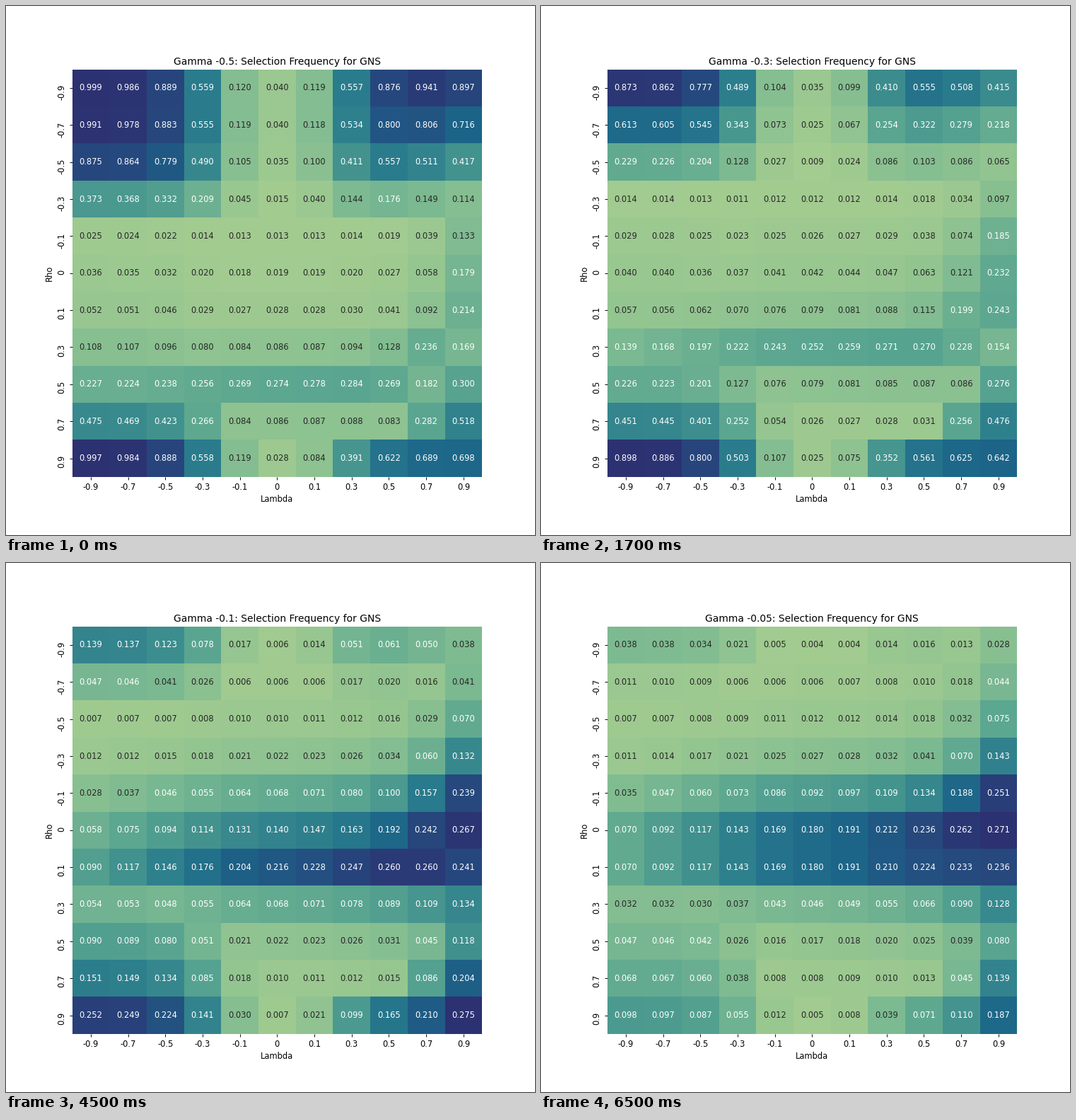
A matplotlib script for the animation above (8000 ms loop, 748x748 px).

```python
import matplotlib.pyplot as plt
import numpy as np
from matplotlib.animation import FuncAnimation
from matplotlib.colors import LinearSegmentedColormap

INCHES, DPI = 9, 748 / 9
STEP_MS, STEPS = 500, 16
GAMMAS = [-0.5, -0.3, -0.2, -0.1, -0.05]
WHITE_TEXT_FROM = .1535  # share of the table's maximum

positive = [0.1, 0.3, 0.5, 0.7, 0.9]
levels = np.array([-v for v in reversed(positive)] + [0] + positive)
level_names = [f"{v:g}" for v in levels]
lam, rho = np.meshgrid(levels, levels)
right = np.maximum(lam, 0)
crest = LinearSegmentedColormap.from_list("crest", [
    "#a5cd90", "#7dba91", "#59a590", "#40908e",
    "#287a8c", "#1c6488", "#254b7f", "#2c3172"])


def ridge(g):
    """Band along rho = -gamma that widens and sinks towards high lambda."""
    edge = right ** 4
    center = g + edge * (-.05 - g)
    width = .135 + .25 * edge
    height = .3 / (1 + .55 * np.exp(-3.5 * g - 2 * lam))
    return height * (1 - .8 * edge * g) / (1 + ((rho - center) / width) ** 2)


def valley():
    """Drop around lambda = 0 that both outer areas share."""
    return 1 - .96 * np.exp(-(lam / .34) ** 2)


def negative_rho_area(g):
    depth = np.maximum(-rho - (.52 - .8 * g), 0)
    strength = ((7.4 * g + .1) * depth) ** 2 * np.exp(-1.5 * right)
    return valley() * (1 - np.exp(-strength))


def positive_rho_area(g):
    peak = 1 - .96 * np.exp(-(g / .2) ** 2)
    distance = .9 - rho
    left_part = peak * np.exp(-distance / (.24 + .015 / g))
    right_peak = .7 * peak + .2 * (1 - peak) * right ** 4
    right_part = right_peak * np.exp(-(distance / (.6 * right ** 3 + .01)) ** 1.5)
    return valley() * np.where(lam < 0, left_part, right_part)


def frequencies(gamma):
    g = abs(gamma)
    return np.maximum.reduce([ridge(g), negative_rho_area(g),
                              positive_rho_area(g)])


plt.rcParams["font.family"] = "DejaVu Sans"
fig, ax = plt.subplots(figsize=(INCHES, INCHES), dpi=DPI)
mesh = ax.pcolormesh(np.zeros_like(lam), cmap=crest, vmin=0, vmax=1)
ax.invert_yaxis()
ax.spines[:].set_visible(False)
centers = np.arange(len(levels)) + .5
ax.set_xticks(centers, level_names)
ax.set_yticks(centers, level_names, rotation="vertical")
ax.set_xlabel("Lambda")
ax.set_ylabel("Rho")
title = ax.set_title("")
labels = [ax.text(x, y, "", ha="center", va="center")
          for y in centers for x in centers]


def update(step):
    # The first table stays for one step, the following ones for four each
    gamma = GAMMAS[(step + 3) // 4]
    table = frequencies(gamma)
    share = table / table.max()
    mesh.set_array(share)
    for label, value, part in zip(labels, table.flat, share.flat):
        label.set_text(f"{value:.3f}")
        label.set_color("white" if part > WHITE_TEXT_FROM else ".15")
    title.set_text(f"Gamma {gamma}: Selection Frequency for GNS")
    return [mesh, title, *labels]


anim = FuncAnimation(fig, update, frames=STEPS, interval=STEP_MS,
                     repeat=True, repeat_delay=0, blit=False)
plt.show()
```
